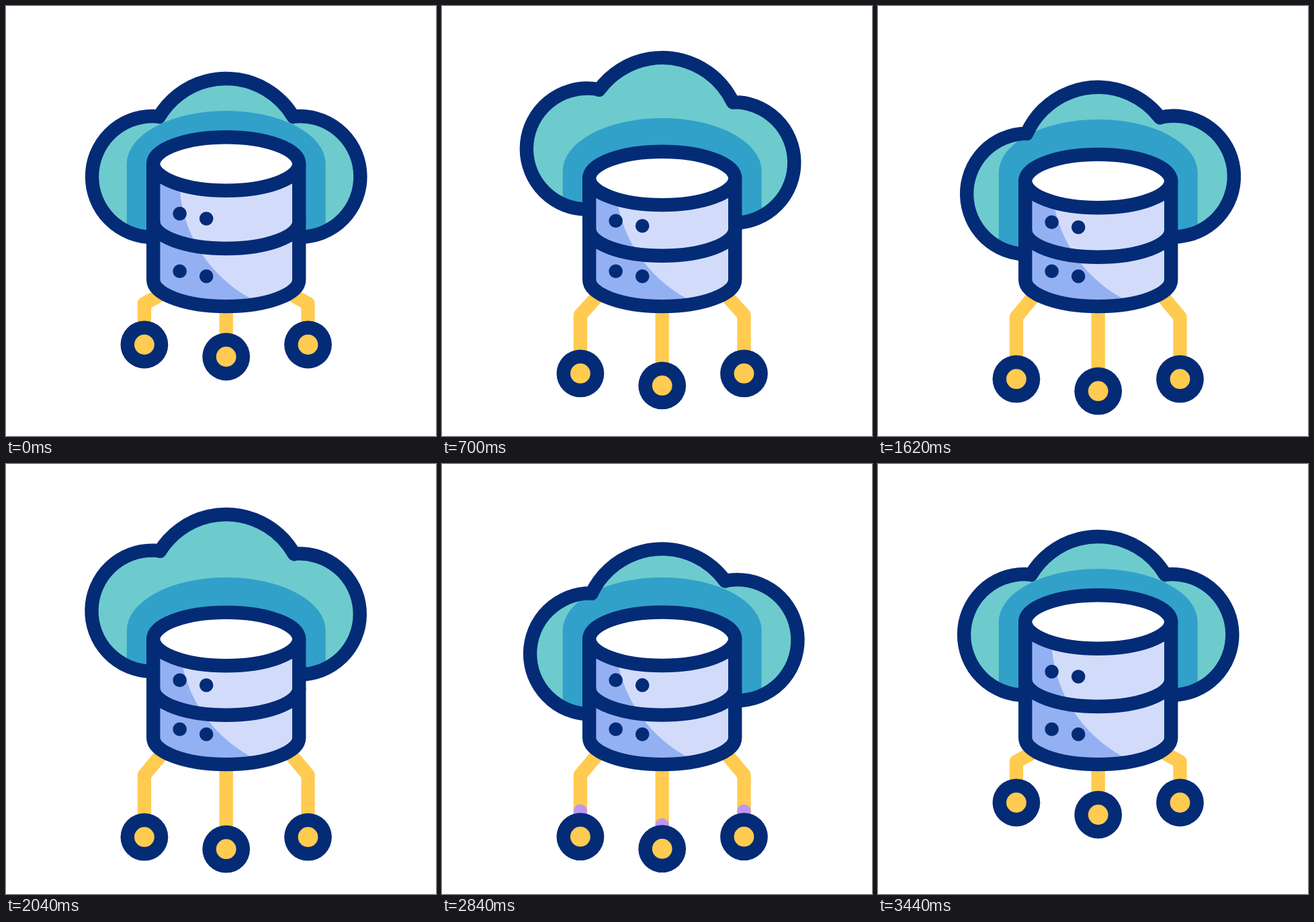
These frames come from a looping animation (640 by 640 pixels, 3600 ms). An HTML page with a canvas:

```html
<!DOCTYPE html>
<html lang="en">
<head>
<meta charset="utf-8">
<title>Cloud database</title>
<style>
  html, body { margin: 0; width: 100%; height: 100%; overflow: hidden; background: #fff; }
  canvas { display: block; width: 640px; height: 640px; }
</style>
</head>
<body>
<canvas id="stage" width="640" height="640"></canvas>
<script>
const ctx = document.getElementById('stage').getContext('2d');
const LOOP = 3600;
const NAVY = '#042b76', TEAL = '#6dcbce', BLUE = '#31a1ca', YELLOW = '#ffcb50';
const PURPLE = '#bd98f2', PALE = '#d2dcfa', PERIWINKLE = '#93b1f2';
const CX = 327.7, LINE = 20.4, RX = 108.5, RY = 39.7;

// Keyframes as [time, value]
const SPREAD = [[200, 0], [880, 1], [2800, 1], [3440, 0]];
const CLOUD_Y = [[200, 0], [840, -35], [1480, 19], [2120, -35], [2760, 19], [3440, 0]];
const CLOUD_TILT = [[200, 0], [940, 7], [1670, -7], [2320, 6.5], [2970, -6.5], [3440, 0]];
const PULSES = [{ start: 880, up: true }, { start: 2286, up: false }];
const PULSE_RUN = 430, PULSE_LAG = 275;

const ease = p => (1 - Math.cos(Math.PI * Math.min(1, Math.max(0, p)))) / 2;

function track(keys, t) {
  let value = keys[0][1];
  for (let i = 1; i < keys.length; i++) {
    const [t0, v0] = keys[i - 1], [t1, v1] = keys[i];
    if (t >= t0) value = v0 + (v1 - v0) * ease((t - t0) / (t1 - t0));
  }
  return value;
}

function stroke(color = NAVY) {
  ctx.strokeStyle = color;
  ctx.lineWidth = LINE;
  ctx.stroke();
}

function fill(color) {
  ctx.fillStyle = color;
  ctx.fill();
}

function disc(x, y, r, color) {
  ctx.beginPath();
  ctx.arc(x, y, r, 0, Math.PI * 2);
  fill(color);
}

function cloudPath(y, tilt) {
  const lobeX = 109.7, lobeY = 28, lobeR = 90;
  const topY = -1.8, topR = 116.2, joinX = 100, joinY = -61;
  const lobeEnd = Math.atan2(joinY - lobeY, lobeX - joinX);
  const topEnd = Math.atan2(joinY - topY, joinX);
  const path = new Path2D();
  path.arc(-lobeX, lobeY, lobeR, Math.PI / 2, lobeEnd);
  path.arc(0, topY, topR, -Math.PI - topEnd, topEnd);
  path.arc(lobeX, lobeY, lobeR, -Math.PI - lobeEnd, Math.PI / 2);
  path.closePath();
  const placed = new Path2D();
  placed.addPath(path, new DOMMatrix().translate(CX, 226 + y).rotate(tilt));
  return placed;
}

function drawCloud(t, spread) {
  const path = cloudPath(track(CLOUD_Y, t), track(CLOUD_TILT, t));
  ctx.fillStyle = TEAL;
  ctx.fill(path);
  ctx.save();
  ctx.clip(path);
  ctx.beginPath();
  ctx.ellipse(CX, 235 + 12.8 * spread, 148, 79, 0, Math.PI, 0);
  ctx.lineTo(CX + 148, 450);
  ctx.lineTo(CX - 148, 450);
  fill(BLUE);
  ctx.restore();
  ctx.strokeStyle = NAVY;
  ctx.lineWidth = LINE;
  ctx.stroke(path);
}

function tracePart(points, from, to) {
  ctx.beginPath();
  let walked = 0;
  const lengths = points.slice(1).map((p, i) => Math.hypot(p[0] - points[i][0], p[1] - points[i][1]));
  const total = lengths.reduce((a, b) => a + b, 0);
  lengths.forEach((len, i) => {
    const a = Math.max(0, (from * total - walked) / len);
    const b = Math.min(1, (to * total - walked) / len);
    const at = k => points[i].map((v, axis) => v + (points[i + 1][axis] - v) * k);
    if (a < b) {
      if (walked <= from * total) ctx.moveTo(...at(a));
      ctx.lineTo(...at(b));
    }
    walked += len;
  });
}

function drawLegs(t, spread) {
  const nodeY = 504 + 51.2 * spread, bendY = 443 + 20 * spread;
  const sideLeg = side => [[CX + side * 91, 426], [CX + side * 121.8, bendY], [CX + side * 121.8, nodeY]];
  const legs = [sideLeg(-1), [[CX, 443], [CX, nodeY + 18]], sideLeg(1)];

  for (const leg of legs) {
    tracePart(leg, 0, 1);
    stroke(YELLOW);
    for (const { start, up } of PULSES) {
      const head = ease((t - start) / PULSE_RUN);
      const tail = ease((t - start - PULSE_LAG) / PULSE_RUN);
      if (head <= tail) continue;
      tracePart(leg, up ? 1 - head : tail, up ? 1 - tail : head);
      stroke(PURPLE);
    }
    const [x, y] = leg[leg.length - 1];
    disc(x, y, 35.4, NAVY);
    disc(x, y, 14.9, YELLOW);
  }
}

function drawDatabase(spread) {
  const topY = 235 + 25.6 * spread, midY = 321.3 + 12.8 * spread, baseY = 407.4;
  const body = new Path2D();
  body.moveTo(CX + RX, topY);
  body.ellipse(CX, baseY, RX, RY, 0, 0, Math.PI);
  body.lineTo(CX - RX, topY);

  ctx.fillStyle = PERIWINKLE;
  ctx.fill(body);
  ctx.save();
  ctx.clip(body);
  disc(461, 257, 203, PALE);
  ctx.restore();

  ctx.beginPath();
  ctx.ellipse(CX, midY, RX, RY, 0, 0, Math.PI);
  stroke();
  ctx.stroke(body);

  ctx.beginPath();
  ctx.ellipse(CX, topY, RX, RY, 0, 0, Math.PI * 2);
  fill('#fff');
  stroke();

  for (const y of [309 + 12.8 * spread, 394.8]) {
    disc(258.6, y, 10.3, NAVY);
    disc(298.2, y + 7.5, 10.3, NAVY);
  }
}

function draw(now) {
  const t = now % LOOP;
  const spread = track(SPREAD, t);
  ctx.fillStyle = '#fff';
  ctx.fillRect(0, 0, 640, 640);
  ctx.lineCap = ctx.lineJoin = 'round';
  drawCloud(t, spread);
  drawLegs(t, spread);
  drawDatabase(spread);
}

const began = performance.now();
function tick() {
  draw(performance.now() - began);
  requestAnimationFrame(tick);
}
tick();
</script>
</body>
</html>
```
